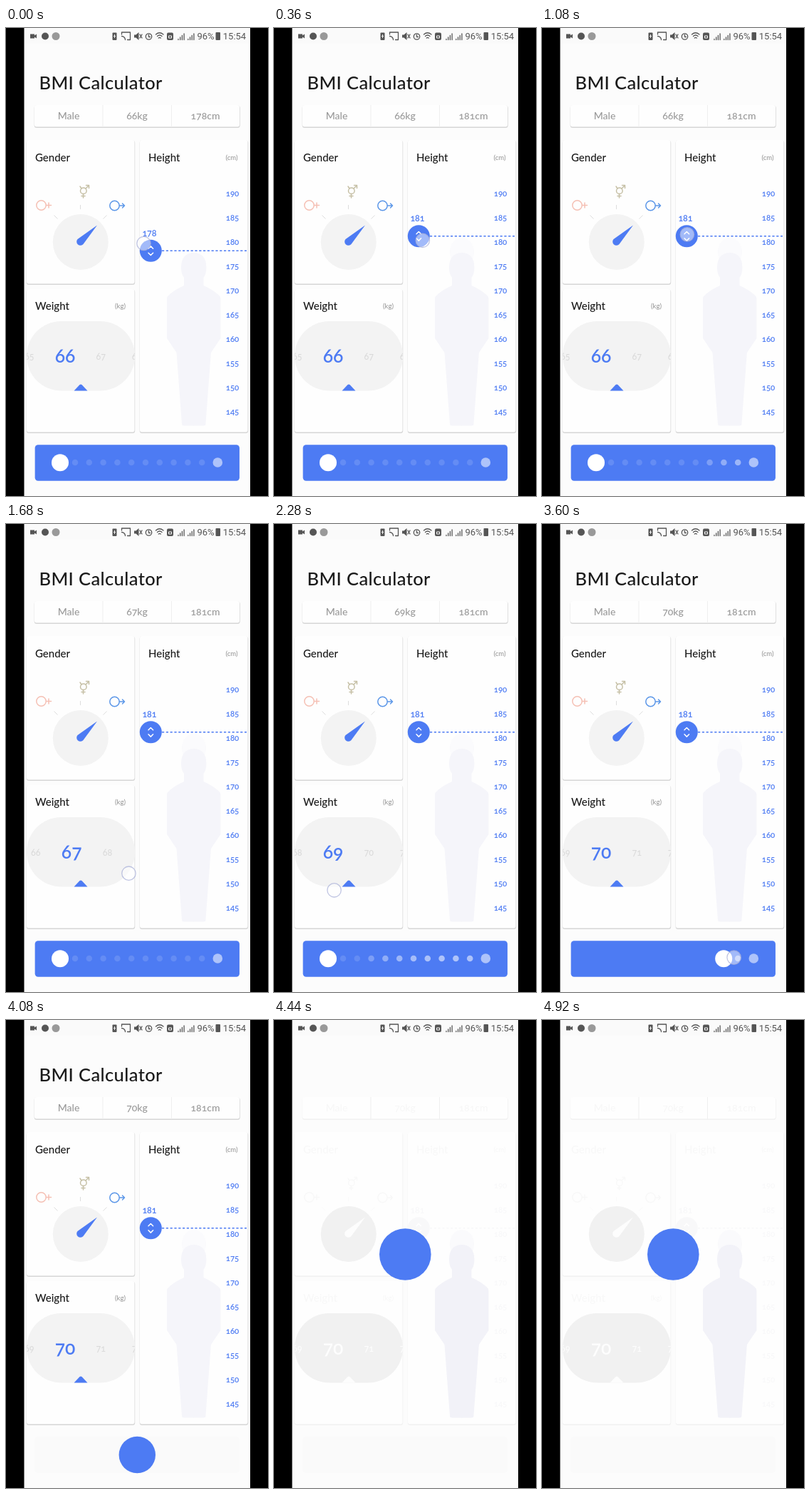
Animation, 368 px wide and 656 px high, one loop 5.04 s. Source, as an HTML page:

```html
<!DOCTYPE html>
<html lang="en">
<head>
<meta charset="utf-8">
<title>BMI Calculator</title>
<style>
html, body { margin: 0; width: 100%; height: 100%; overflow: hidden; background: #000; }
svg {
  display: block; width: 100%; height: 100%;
  --ink: #1a1a1a; --blue: #4d7bf3; --sky: #5c97e8; --gray: #999; --faint: #dadada; --accent: #4d7bf3;
  --pink: #f5c0b4; --sand: #c6c0a6; --tick: #ddd; --edge: #d6d6d6; --body: #f5f5fa; --fill: #f3f3f3;
  font-family: Raleway, Lato, "Open Sans", sans-serif; font-weight: 500;
  font-variant-numeric: oldstyle-nums;
}
svg.gone {
  --ink: #f8f8f8; --blue: #f8f8f9; --sky: #f8f8f8; --gray: #f7f7f7; --faint: #fdfdfd; --accent: #fdfdfd;
  --pink: #f8f8f8; --sand: #f8f8f8; --tick: #fafafa; --edge: #f1f1f1; --body: #f2f2f8; --fill: #f1f1f1;
}
.gone #title { display: none; }
.card { fill: #fefefe; }
.edge { fill: var(--edge); }
.head { font-size: 15px; fill: var(--ink); }
.unit { font-size: 9.5px; fill: var(--gray); }
.stat { font-size: 14px; fill: var(--gray); text-anchor: middle; }
.scale { font-size: 11.5px; fill: var(--blue); text-anchor: middle; font-weight: 600; }
.num { text-anchor: middle; }
.status { font: 400 13px Roboto, sans-serif; fill: #555; }
.line { fill: none; stroke-linecap: round; stroke-linejoin: round; }
</style>
</head>
<body>
<svg id="stage" viewBox="0 0 368 656" preserveAspectRatio="none">
  <defs><clipPath id="pill"><rect x="29" y="411" width="152" height="97.5" rx="48.5"/></clipPath></defs>
  <rect width="368" height="656"/>
  <rect x="25.5" width="317.5" height="656" fill="#fcfcfc"/>
  <rect x="26" width="317" height="22" fill="#fafafa"/>

  <g fill="#555">
    <path d="M34 8.5h6v2l3-2v6l-3-2v2h-6z"/>
    <circle cx="55" cy="11.5" r="5"/>
    <circle cx="70" cy="11.5" r="5.5" fill="#999"/>
    <rect x="149.5" y="6.5" width="6" height="10.5" rx="1"/>
    <path d="M180 9.5h2.5l4-3.5v11l-4-3.5h-2.5z"/>
    <rect x="226" y="6.5" width="9" height="10.5" rx="2"/>
    <rect x="294.5" y="6" width="6.5" height="11" rx="1"/>
  </g>
  <g class="line" stroke="#555" stroke-width="1.3">
    <path d="M162.5 9v-3h12v10.5h-4m-8-5a5 5 0 0 1 5 5M188 9l3 5m0-5l-3 5"/>
    <circle cx="200.5" cy="12" r="4.2"/>
    <path d="M200.5 9.5v3h2M210.5 9q5-4.5 10.5 0m-8.5 2.5q3.300-3 6.5 0m-4.700 2.500q1.500-1.300 3 0"/>
    <path id="bars"/>
  </g>
  <path d="M152.500 9v5m-1.500-2.500h3M228.500 11h4v3h-4z" fill="none" stroke="#fafafa"/>
  <text class="status" x="268.5" y="16">96%</text>
  <text class="status" x="304.8" y="16">15:54</text>

  <text id="title" x="46.5" y="86" font-size="25.5" letter-spacing=".38" fill="var(--ink)">BMI Calculator</text>

  <g id="cards"></g>
  <path d="M136 108v31M232.5 108v31" stroke="#efefef"/>
  <text class="stat" x="88" y="128">Male</text>
  <text class="stat" id="kg" x="184" y="128"></text>
  <text class="stat" id="cm" x="280" y="128"></text>

  <text class="head" x="41" y="187">Gender</text>
  <text class="head" x="41" y="395">Weight</text>
  <text class="head" x="200" y="187">Height</text>
  <text class="unit" x="153" y="393">(kg)</text>
  <text class="unit" x="308.5" y="185">(cm)</text>

  <circle cx="104.8" cy="300" r="39" fill="var(--fill)"/>
  <path d="M104.5 248v6M67.5 262.5l5 5M141.5 262.5l-5 5" stroke="var(--tick)"/>
  <path d="M128 276.5L108.5 303A5.200 5.200 0 1 1 100.500 296Z" fill="var(--accent)"/>
  <g class="line" stroke-width="1.5">
    <g stroke="var(--pink)">
      <path d="M56.5 248.5h7m-3.500-3.500v7"/>
      <circle cx="49.500" cy="248.500" r="6.700"/>
    </g>
    <g stroke="var(--sky)">
      <path d="M159.500 249h7m-3-3l3 3l-3 3"/>
      <circle cx="152.500" cy="249" r="6.700"/>
    </g>
    <g stroke="var(--sand)">
      <path d="M112 225l4.500-4.500m-4 0h4v4M108.500 232.500v5.500m-2.500-2.500h5M106 225l-2-3"/>
      <circle cx="108.800" cy="228.200" r="4.300"/>
    </g>
  </g>

  <rect x="29" y="411" width="152" height="97.5" rx="48.5" fill="var(--fill)"/>
  <g id="reel" clip-path="url(#pill)"></g>
  <path d="M95.500 508.500L103.500 500Q105 498.800 106.500 500L114.500 508.500Z" fill="var(--accent)"/>

  <g fill="var(--body)">
    <ellipse id="crown" cx="264" cy="314" rx="17" ry="20" opacity=".4"/>
    <path id="half" d="M264.500 315Q246 315 246 336Q246 345 250 350V361Q236 367 227 376Q226 377 226 380V435L239.500 455L247 555Q247 557.500 250 557.500H264.500Z"/>
    <use href="#half" transform="translate(527.400) scale(-1 1)"/>
  </g>
  <g id="marks"></g>
  <g id="grip">
    <path d="M219 0H338" stroke="var(--blue)" stroke-width="1.500" stroke-dasharray="3.200 2.600"/>
    <text id="tall" class="num" x="201.500" y="-20.500" font-size="12.500" font-weight="600" fill="var(--blue)"></text>
    <circle cx="203.300" r="15.500" fill="var(--blue)"/>
    <path d="M200 -3l3.300-3.300l3.300 3.300M200 3l3.300 3.300l3.300-3.300" class="line" stroke="#fff" stroke-width="1.500"/>
  </g>

  <rect x="40" y="584" width="288" height="51" rx="5" fill="#fafafa"/>
  <g id="slider">
    <rect id="bar" y="584.300" height="50.400" fill="#4d7bf3"/>
    <g id="dots" fill="#fff"></g>
    <circle id="knob" cy="609.300" r="12" fill="#fff"/>
  </g>
  <circle id="ball" cx="184.300" fill="#4d7bf3"/>
  <circle id="touch" r="9.700" fill="#fff" fill-opacity=".48" stroke="#a9b0d8" stroke-opacity=".75" stroke-width="1.300"/>
</svg>
<script>
const LOOP = 5040, TICK = 120;
const $ = id => document.getElementById(id);
function set(el, attrs) {
  for (const k in attrs) el.setAttribute(k, attrs[k]);
}
function add(parent, tag, attrs, text = '') {
  const el = document.createElementNS('http://www.w3.org/2000/svg', tag);
  set(el, attrs);
  el.textContent = text;
  return parent.appendChild(el);
}
const show = (el, on) => { el.style.display = on ? '' : 'none'; };

// Progress 0..1 between two times, and a hump that rises and falls between them
const ramp = (t, from, to) => Math.min(1, Math.max(0, (t - from) / (to - from)));
const hump = (t, from, to) => Math.sin(Math.PI * ramp(t, from, to));
const mix = (a, b, u) => a + (b - a) * u;

const heightAt = t => 178 + 3 * ramp(t, 0, 120) + 2 * hump(t, 120, 360) - hump(t, 360, 840);
const weightAt = t => 66 + 3 * ramp(t, 1500, 2160) + ramp(t, 2460, 2640);
const knobAt = t => mix(76, 300, ramp(t, 3120, 3720));
const riseAt = t => mix(609.5, 328.5, Math.sin(Math.PI / 2 * ramp(t, 4080, 4410) ** 1.2));

// Damped spring from the button's radius to the loader's
function swellAt(t) {
  const s = Math.max(0, t - 4320) / 240;
  return 36.3 - 10.6 * Math.exp(-1.2 * s) * Math.cos(Math.PI * s);
}

// Finger strokes; bow pushes the path sideways midway
const STROKES = [
  { start: 0, end: 1200, from: [193.5, 302], to: [203, 288], bow: 19 },
  { start: 1560, end: 2400, from: [190, 485], to: [67, 518], bow: 0 },
  { start: 3120, end: 3720, from: [80, 610], to: [317, 607], bow: 0 }
];

// Wave of brightness running along the dots
function glow(i, t) {
  const cycle = 1360, p = ((t - 470 + cycle) % cycle) / 800;
  return .13 + .42 * Math.sqrt(Math.max(0, hump(p, .04 * i, .04 * i + .5)));
}

for (const [x, y, w, h] of [[40, 108, 288, 30.5], [29, 157, 151.5, 201.5], [29, 366, 151.5, 200.5], [188, 157, 151.5, 409.5]]) {
  add($('cards'), 'rect', { x: x - .3, y: y + .5, width: w + 1, height: h + 1, rx: 3.5, class: 'edge' });
  add($('cards'), 'rect', { x, y, width: w, height: h, rx: 3, class: 'card' });
}
for (let i = 0; i < 10; i++) {
  add($('marks'), 'text', { x: 318, y: 235.5 + 34 * i, class: 'scale' }, 190 - 5 * i);
}
let bars = '';
for (let i = 0; i < 8; i++) {
  bars += `M${242 + 2.7 * i + (i > 3 ? 3 : 0)} 16.500v${-1 - 2.5 * (i % 4)}`;
}
set($('bars'), { d: bars });

const dots = Array.from({ length: 11 }, (_, i) => {
  const last = i === 10, x = last ? 297.3 : 97 + 19.8 * i;
  return { x, el: add($('dots'), 'circle', { cx: x, cy: 609, r: last ? 6.8 : 4.3, opacity: .55 }) };
});
const reel = Array.from({ length: 6 }, () => add($('reel'), 'text', { class: 'num' }));

function drawReel(v) {
  reel.forEach((el, k) => {
    const n = Math.floor(v) - 2 + k, big = n === Math.round(v);
    el.textContent = n;
    set(el, {
      x: 83 + (n - v) * 50.3, y: big ? 469 : 465,
      'font-size': big ? 26.5 : 12.5, 'font-weight': big ? 600 : 500,
      fill: big ? 'var(--accent)' : 'var(--faint)'
    });
  });
}

function drawSlider(t) {
  const x = knobAt(t), fold = ramp(t, 3720, 4080), width = mix(287.3, 51, fold);
  show($('slider'), t < 4080);
  show($('knob'), fold === 0);
  set($('bar'), { x: 184.3 - width / 2, width, rx: mix(4.5, 25.2, fold) });
  set($('knob'), { cx: x });
  dots.forEach((dot, i) => {
    show(dot.el, dot.x > x + 8);
    if (i < 10) set(dot.el, { opacity: glow(i, t) });
  });
}

function drawTouch(t) {
  const s = STROKES.find(s => t >= s.start && t <= s.end);
  show($('touch'), s);
  if (!s) return;
  const u = ramp(t, s.start, s.end);
  set($('touch'), {
    cx: mix(s.from[0], s.to[0], u) + s.bow * Math.sin(Math.PI * u) ** 2,
    cy: mix(s.from[1], s.to[1], u)
  });
}

function draw(t) {
  const h = Math.round(heightAt(t)), w = weightAt(t);
  $('stage').classList.toggle('gone', t >= 4200);
  $('cm').textContent = h + 'cm';
  $('kg').textContent = Math.round(w) + 'kg';
  $('tall').textContent = h;
  set($('grip'), { transform: `translate(0 ${298.6 + (180 - h) * 6.8})` });
  show($('crown'), h > 178);
  drawReel(w);
  drawSlider(t);
  show($('ball'), t >= 4080);
  set($('ball'), { cy: riseAt(t), r: swellAt(t) });
  drawTouch(t);
}

const start = performance.now();
function loop() {
  const t = (performance.now() - start) % LOOP;
  draw(Math.floor(t / TICK) * TICK);
  requestAnimationFrame(loop);
}
loop();
</script>
</body>
</html>
```
